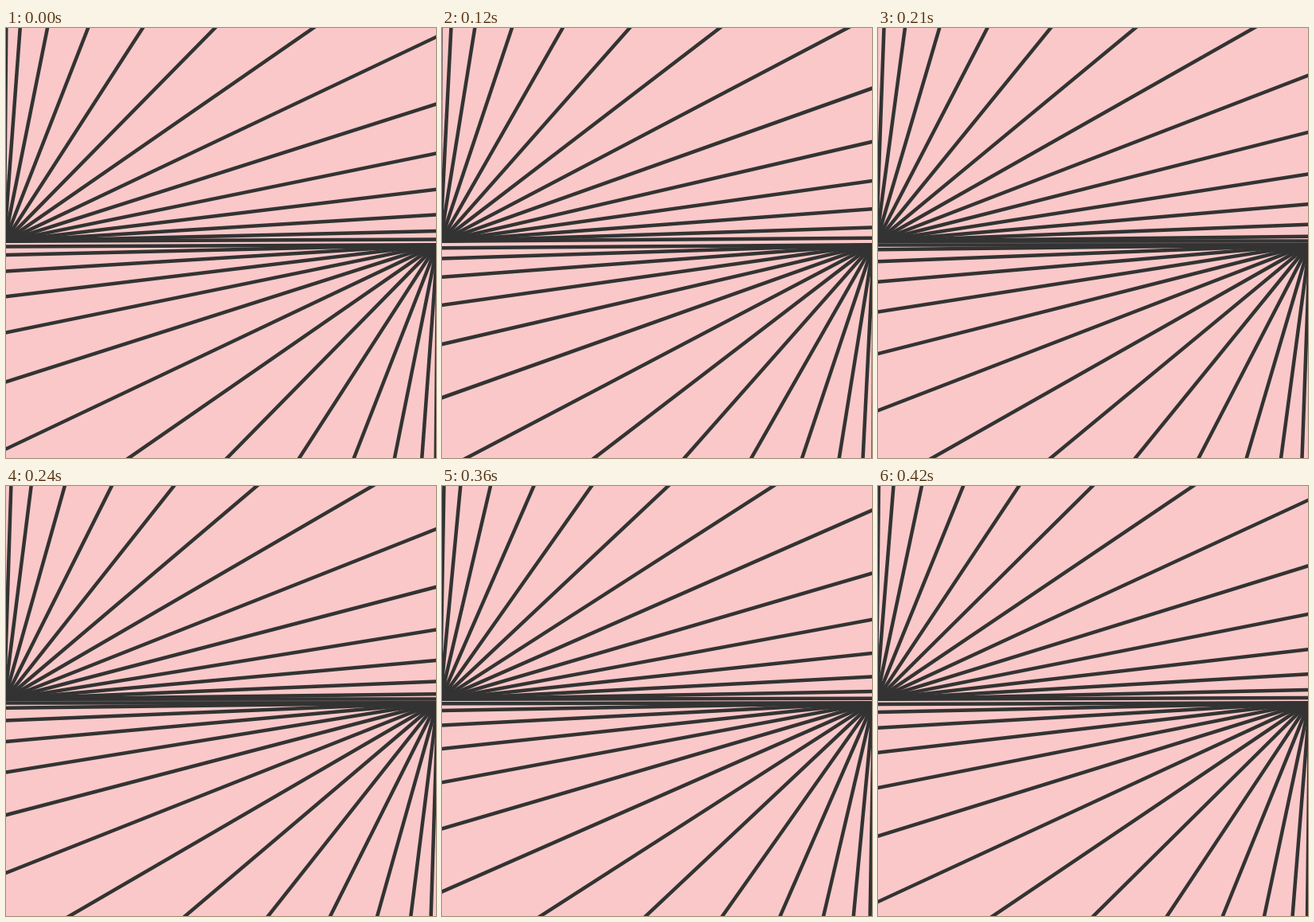
An HTML page with a canvas for the animation above (450 ms loop, 540x540 px).

```html
<!DOCTYPE html>
<html lang="en">
<head>
<meta charset="utf-8">
<title>Line fans</title>
<style>
  html, body {
    margin: 0;
    width: 100%;
    height: 100%;
    overflow: hidden;
    background: #fac8c8;
  }
  canvas { display: block; }
</style>
</head>
<body>
<canvas id="stage" width="540" height="540"></canvas>
<script>
const ctx = document.getElementById('stage').getContext('2d');
const SIZE = 540, MID = SIZE / 2;
const PERIOD = 450;      // time between two new lines
const STEP = 0.07;       // share of a swing per period
const PHASE = 0.715;     // age of the youngest line at time zero, in periods
const THICK = 4.5, LENGTH = 900;
const X1 = 0.586, X2 = 0.7;

// cubic-bezier(X1, 0, X2, 1)
function ease(x) {
  let lo = 0, hi = 1;
  for (let i = 0; i < 24; i++) {
    const t = (lo + hi) / 2, s = 1 - t;
    if (3 * X1 * t * s * s + 3 * X2 * t * t * s + t * t * t < x) lo = t;
    else hi = t;
  }
  return lo * lo * (3 - 2 * lo);
}

// Each line is a bar that swings up about its lower left corner.
function fan(turn, age) {
  for (let u = age * STEP; u < 1; u += STEP) {
    ctx.save();
    ctx.translate(MID, MID);
    ctx.rotate(turn);
    ctx.translate(-MID, 0);
    ctx.rotate(-ease(u) * Math.PI / 2);
    ctx.fillRect(0, -THICK, LENGTH, THICK);
    ctx.restore();
  }
}

function draw(now) {
  const age = (PHASE + now / PERIOD) % 1;
  ctx.fillStyle = '#fac8c8';
  ctx.fillRect(0, 0, SIZE, SIZE);
  ctx.fillStyle = '#333';
  fan(0, age);
  fan(Math.PI, age);
  requestAnimationFrame(draw);
}
requestAnimationFrame(draw);
</script>
</body>
</html>
```
